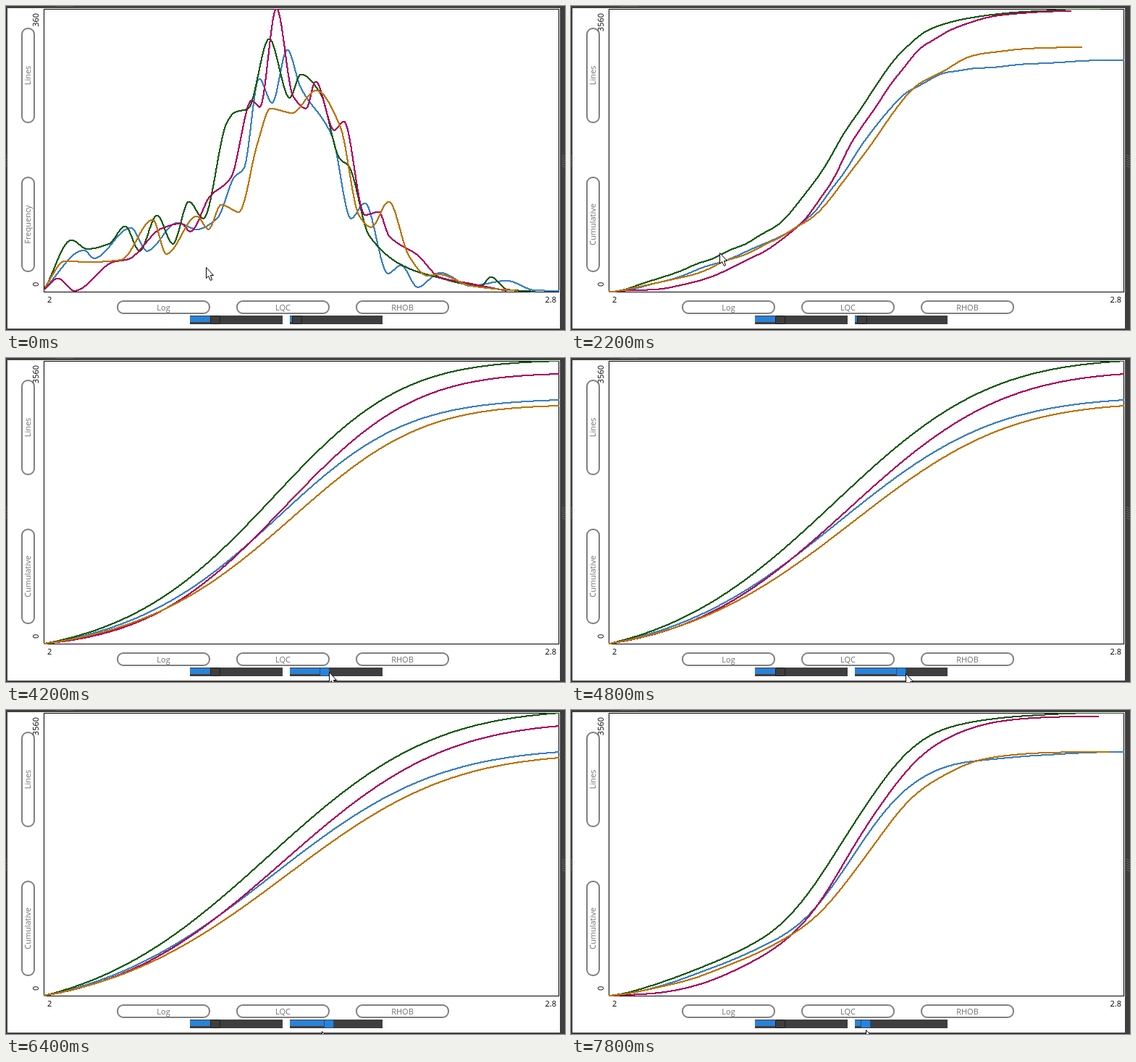
Recreate the animation shown at these times as an HTML page with a canvas. Size 772 px wide and 448 px high, loop 8 s.

```html
<!DOCTYPE html>
<html lang="en">
<head>
<meta charset="utf-8">
<title>Log histogram</title>
<style>
html, body { margin: 0; width: 100%; height: 100%; overflow: hidden; background: #fff; }
canvas { display: block; }
</style>
</head>
<body>
<canvas id="stage" width="772" height="448"></canvas>
<script>
const g = document.getElementById('stage').getContext('2d');
const LOOP = 8000, STEP = 200;
const LEFT = 52, RIGHT = 764, BASE = 395, BIN = 4;
const DARK = '#403d3e', BLUE = '#2a82d7', GREY = '#808080', INK = '#707070';

// Monotone cubic through x, y pairs
function spline(flat) {
  const xs = flat.filter((v, i) => i % 2 === 0), ys = flat.filter((v, i) => i % 2);
  const n = xs.length, d = [], m = [];
  for (let i = 0; i < n - 1; i++) d.push((ys[i + 1] - ys[i]) / (xs[i + 1] - xs[i]));
  for (let i = 0; i < n; i++) {
    const a = d[Math.max(i - 1, 0)], b = d[Math.min(i, n - 2)];
    m.push(a * b > 0 ? 2 * a * b / (a + b) : 0);
  }
  const at = x => {
    if (x <= xs[0]) return ys[0];
    if (x >= xs[n - 1]) return ys[n - 1];
    let i = 0;
    while (xs[i + 1] < x) i++;
    const h = xs[i + 1] - xs[i], u = (x - xs[i]) / h, v = 1 - u;
    return v * v * ((1 + 2 * u) * ys[i] + u * h * m[i])
         + u * u * ((1 + 2 * v) * ys[i + 1] - v * h * m[i + 1]);
  };
  return { at, from: xs[0], to: xs[n - 1] };
}

// Each frequency curve is given by its peaks and valleys
const curve = (color, ...turns) => ({ color, ...spline(turns) });
const curves = [
  curve('#3a7fc1', 53,390, 106,338, 120,349, 171,307, 193,339, 235,300, 262,309, 290,294,
    314,237, 327,225, 348,101, 366,134, 387,61, 405,112, 449,181, 475,294, 494,273, 526,370,
    544,359, 567,389, 598,369, 640,387, 690,380, 728,393, 763,394),
  curve('#175a12', 53,390, 89,324, 110,336, 141,329, 163,305, 183,339, 207,290, 229,329,
    251,271, 271,294, 303,163, 315,147, 333,142, 362,46, 390,127, 406,95, 433,122, 459,211,
    472,222, 500,318, 548,360, 586,373, 655,387, 668,375, 690,392, 730,395),
  curve('#a9005d', 53,391, 70,377, 93,394, 147,354, 168,350, 213,308, 240,301, 253,312,
    280,264, 309,238, 338,131, 349,140, 372,4, 395,125, 413,142, 426,105, 452,172, 465,160,
    494,289, 513,285, 528,319, 567,345, 597,375, 640,384, 690,394),
  curve('#bb7304', 53,388, 80,353, 116,354, 158,351, 201,296, 220,343, 262,291, 278,309,
    296,275, 320,285, 346,190, 364,142, 394,148, 427,117, 460,167, 486,290, 503,306, 527,271,
    555,346, 580,373, 595,371, 640,387, 705,394)
];

// Keyframes: time, then values
const cursorKeys = [[0, 276, 361], [200, 160, 325], [400, 25, 289], [600, 29, 300],
  [1800, 29, 300], [2000, 39, 295], [2600, 537, 432], [3200, 396, 436], [3400, 400, 436],
  [4200, 446, 434], [5400, 478, 437], [5600, 478, 439], [6400, 436, 444], [7800, 407, 442]];
const knobKeys = [[3200, 395], [4200, 433], [5400, 464], [5600, 464], [6400, 439], [7800, 400]];
const sigmaKeys = [[3200, 0], [4200, 106], [5400, 170], [5600, 170], [6400, 148], [7800, 22]];
const rippleKeys = [[1000, 8, 0.6], [1200, 13, 0.6], [1600, 24, 0.25], [1800, 24, 0]];
// Final height of each cumulative curve by smoothing width
const totalKeys = [[0, 320, 391, 388, 338], [22, 337, 391, 386, 337], [106, 337, 391, 373, 329]];

const mix = (a, b, u) => a + (b - a) * u;
function track(keys, t) {
  if (t <= keys[0][0]) return keys[0].slice(1);
  const i = keys.findIndex(k => k[0] > t);
  if (i < 0) return keys[keys.length - 1].slice(1);
  const a = keys[i - 1], b = keys[i], u = (t - a[0]) / (b[0] - a[0]);
  return a.slice(1).map((v, j) => mix(v, b[j + 1], u));
}

// Gaussian blur of the histogram; nothing lies outside the axis
function blur(bins, sigma) {
  if (sigma < 1) return bins;
  const kernel = bins.map((v, d) => Math.exp(-0.5 * (d * BIN / sigma) ** 2));
  return bins.map((v, i) => bins.reduce((sum, b, j) => sum + b * kernel[Math.abs(i - j)], 0));
}

// Running total of the blurred histogram, scaled to end at the given height
function cumulate(c, sigma, height) {
  const bins = [];
  for (let x = LEFT + BIN / 2; x < RIGHT; x += BIN) bins.push(x > c.to ? 0 : BASE - c.at(x));
  const sums = [0];
  for (const b of blur(bins, sigma)) sums.push(sums[sums.length - 1] + b);
  const scale = height / sums[sums.length - 1];
  return x => {
    const p = (x - LEFT) / BIN, i = Math.min(Math.floor(p), bins.length - 1);
    return BASE - scale * mix(sums[i], sums[i + 1], p - i);
  };
}

function rect(color, x, y, w, h) {
  g.fillStyle = color;
  g.fillRect(x, y, w, h);
}

function label(text, x, y, color, align, turned) {
  g.save();
  g.translate(x, y);
  if (turned) g.rotate(-Math.PI / 2);
  g.font = '11px "Open Sans", sans-serif';
  g.textAlign = align;
  g.fillStyle = color;
  g.fillText(text, 0, 0);
  g.restore();
}

function button(text, x, y, w, h) {
  g.beginPath();
  g.roundRect(x + 1, y + 1, w - 2, h - 2, 8);
  g.lineWidth = 2;
  g.strokeStyle = GREY;
  g.stroke();
  if (h > w) label(text, x + 13, y + h / 2, INK, 'center', true);
  else label(text, x + w / 2, y + 14, INK, 'center');
}

function slider(x, knob, active) {
  rect(DARK, x, 428, 128, 12);
  rect(BLUE, x, 429, knob - x, 8);
  g.beginPath();
  g.roundRect(knob + 0.5, 428.5, 13, 11, 2);
  g.fillStyle = active ? BLUE : DARK;
  g.fill();
  g.lineWidth = 1;
  g.strokeStyle = active ? '#1d4f80' : '#1c1a1b';
  g.stroke();
}

function plot(color, at, from, to) {
  g.fillStyle = color;
  let last = Math.round(at(from));
  for (let x = from; x < to; x++) {
    const y = Math.round(at(x));
    g.fillRect(x, Math.min(y, last) - 1, 2, Math.max(2, Math.abs(y - last) + 1));
    last = y;
  }
}

function frame() {
  rect('#fff', 0, 0, 772, 448);
  rect(DARK, 0, 0, 772, 3);
  rect('#5a5758', 68, 0, 25, 1);
  rect(DARK, 0, 0, 2, 448);
  rect(DARK, 765, 0, 7, 448);
  rect(DARK, 0, 446, 772, 2);
  for (let y = 206; y < 223; y += 3) {
    rect('#8a8788', 0, y, 1, 1);
    rect('#8a8788', 768, y, 1, 1);
    rect('#8a8788', 770, y + 1, 1, 1);
  }
  g.lineWidth = 1;
  g.strokeStyle = '#000';
  g.strokeRect(52.5, 4.5, 711, 391);
}

function pointer(x, y) {
  g.save();
  g.translate(x + 0.5, y + 0.5);
  g.beginPath();
  [[0, 0], [0, 15], [3, 12], [6, 18], [8, 17], [6, 11], [10, 11]].forEach(p => g.lineTo(...p));
  g.closePath();
  g.fillStyle = '#fff';
  g.fill();
  g.lineWidth = 1;
  g.strokeStyle = '#000';
  g.stroke();
  g.restore();
}

function ripple(t) {
  if (t < 1000 || t >= 1800) return;
  const [r, alpha] = track(rippleKeys, t);
  g.save();
  g.globalAlpha = alpha;
  g.beginPath();
  g.arc(28, 300, r, 0, 7);
  g.fillStyle = '#f37878';
  g.fill();
  g.lineWidth = 2;
  g.setLineDash([7, 3]);
  g.strokeStyle = '#d83c3c';
  g.stroke();
  g.restore();
}

function drawCurves(t, summed) {
  const [sigma] = track(sigmaKeys, t), heights = track(totalKeys, sigma);
  g.save();
  g.beginPath();
  g.rect(LEFT, 4, RIGHT - LEFT, 392);
  g.clip();
  curves.forEach((c, i) => {
    if (!summed) return plot(c.color, c.at, c.from, c.to);
    const end = Math.min(RIGHT, c.to + sigma * 1.7);
    plot(c.color, cumulate(c, sigma, heights[i]), LEFT, end);
  });
  g.restore();
}

function draw(t) {
  const summed = t >= 1200;
  frame();
  button('Lines', 21, 30, 19, 132);
  button(summed ? 'Cumulative' : 'Frequency', 21, 236, 19, 132);
  button('Log', 153, 407, 129, 19);
  button('LQC', 318, 407, 129, 19);
  button('RHOB', 483, 407, 129, 19);
  label(summed ? '3560' : '360', 45, 10, '#000', 'right', true);
  label('0', 45, 388, '#000', 'left', true);
  label('2', 57, 410, '#000', 'left');
  label('2.8', 760, 410, '#000', 'right');
  drawCurves(t, summed);
  slider(254, 282, false);
  slider(392, Math.round(track(knobKeys, t)[0]), t >= 3000);
  ripple(t);
  pointer(...track(cursorKeys, t).map(Math.round));
}

const start = performance.now();
let shown = -1;
function tick() {
  const t = Math.floor((performance.now() - start) % LOOP / STEP) * STEP;
  if (t !== shown) draw(shown = t);
  requestAnimationFrame(tick);
}
tick();
</script>
</body>
</html>
```
